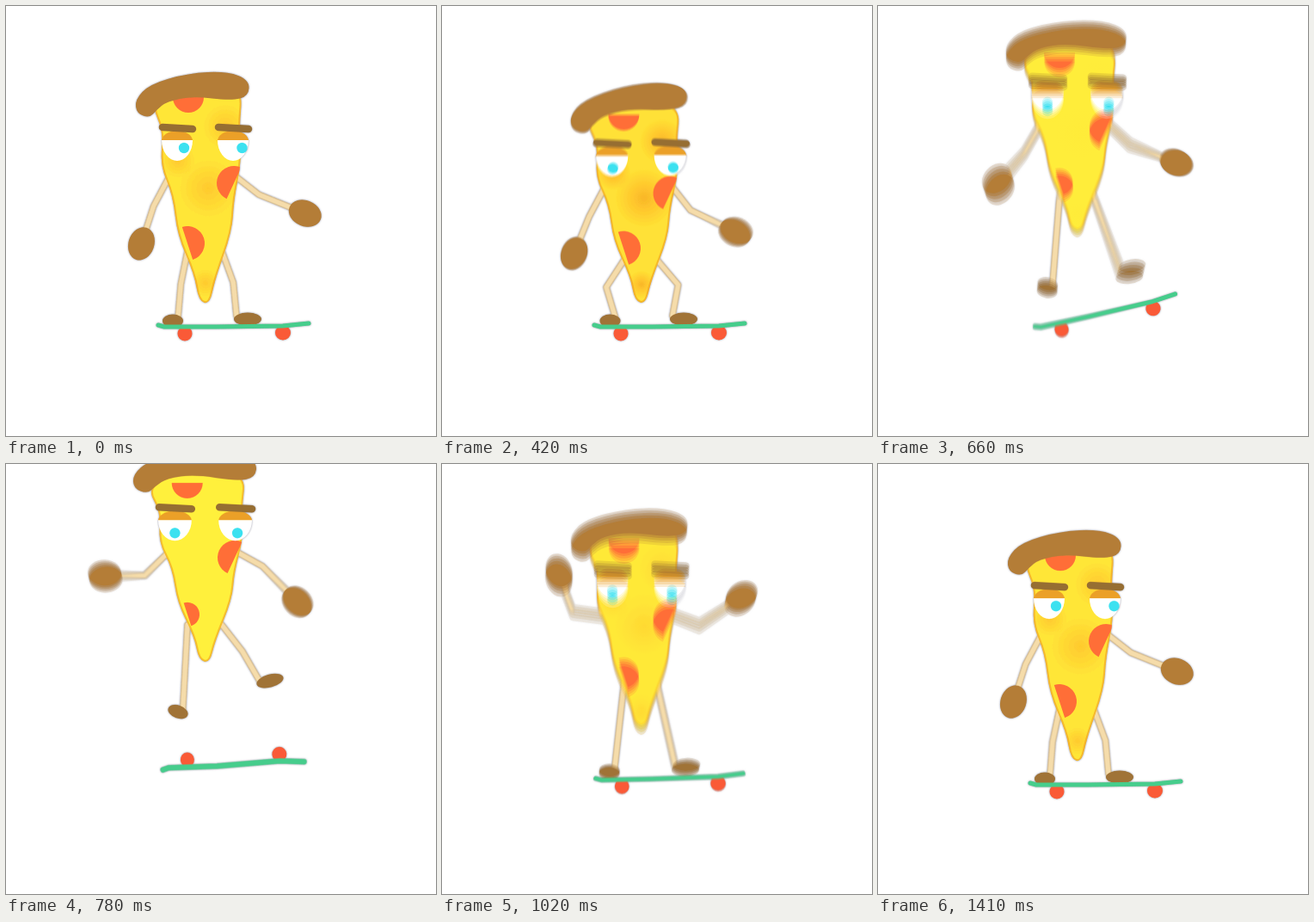
An HTML page with a canvas that plays this animation: 500 by 500 pixels, repeating every 1440 ms.

```html
<!DOCTYPE html>
<html>
<head>
<meta charset="utf-8">
<style>
  html, body { margin: 0; height: 100%; overflow: hidden; background: #fff; }
  canvas { display: block; }
</style>
</head>
<body>
<canvas id="stage" width="500" height="500"></canvas>
<script>
const SIZE = 500, LOOP = 1440, STEP = 30, SHUTTER = 22, SAMPLES = 5;
const TAU = Math.PI * 2, rad = d => d * Math.PI / 180;
const BROWN = '#b07b37', FOOT = '#a07335', BROW = '#966c30', PEPPERONI = '#ff6a35', WHEEL = '#f95a34';

const OUTLINE = [[168, 112], [183, 146], [179, 185], [194, 220], [199, 266], [219, 312], [224, 343],
  [237, 347], [243, 318], [263, 262], [265, 225], [274, 180], [271, 145], [276, 88], [200, 92]];
const CRUST = [[-67, 8], [-50, -10], [-5, -23], [40, -25], [66, -15], [65, 4], [45, 9], [0, 4],
  [-30, 10], [-42, 20], [-50, 29], [-65, 24]];
const BAKED = [[235, 212, 34], [200, 180, 20], [255, 140, 26], [232, 322, 16]];

const stage = document.getElementById('stage').getContext('2d');
const layer = () => Object.assign(document.createElement('canvas'), { width: SIZE, height: SIZE }).getContext('2d');
const c = layer(), blend = layer();

const clamp = x => Math.max(0, Math.min(1, x));
const ramp = (t, from, to) => { const u = clamp((t - from) / (to - from)); return u * u * (3 - 2 * u); };
const bump = (t, from, peak, to) => ramp(t, from, peak) - ramp(t, peak, to);
const polar = ([x, y], length, degrees) =>
  [x + length * Math.cos(rad(degrees)), y + length * Math.sin(rad(degrees))];

function smoothPath(points) {
  const mid = (p, q) => [(p[0] + q[0]) / 2, (p[1] + q[1]) / 2];
  c.beginPath();
  c.moveTo(...mid(points[points.length - 1], points[0]));
  points.forEach((p, i) => c.quadraticCurveTo(...p, ...mid(p, points[(i + 1) % points.length])));
  c.closePath();
}

function oval(x, y, rx, ry, color, degrees = 0, from = 0, to = 360) {
  c.fillStyle = color;
  c.beginPath();
  c.ellipse(x, y, rx, ry, rad(degrees), rad(from), rad(to));
  c.fill();
}

function line(points, width, color) {
  c.lineCap = c.lineJoin = 'round';
  c.lineWidth = width;
  c.strokeStyle = color;
  c.beginPath();
  points.forEach(p => c.lineTo(...p));
  c.stroke();
}

function limb(...points) {
  line(points, 7.5, '#d9c196');
  line(points, 5, '#f3d8a6');
}

function glow(x, y, r, alpha) {
  const g = c.createRadialGradient(x, y, 0, x, y, r);
  g.addColorStop(0, `rgba(245,140,25,${alpha})`);
  g.addColorStop(1, 'rgba(245,140,25,0)');
  c.fillStyle = g;
  c.fillRect(x - r, y - r, 2 * r, 2 * r);
}

// The knee follows from a fixed shin and thigh length; side picks where it bends.
function drawLeg(hip, foot, heel, length, degrees, side) {
  const [ax, ay] = polar([foot[0], foot[1] - 4], heel, degrees);
  const dx = ax - hip[0], dy = ay - hip[1], reach = Math.hypot(dx, dy);
  const bend = side * .75 * Math.sqrt(Math.max(0, 39 ** 2 - reach ** 2 / 4)) / reach;
  limb(hip, [hip[0] + dx / 2 + dy * bend, hip[1] + dy / 2 - dx * bend], [ax, ay]);
  oval(...foot, length, 7.5, FOOT, degrees);
}

function drawArm(shoulder, upper, upperAngle, fore, foreAngle) {
  const elbow = polar(shoulder, upper, upperAngle), hand = polar(elbow, fore, foreAngle);
  limb(shoulder, elbow, hand);
  oval(...hand, 19.5, 15, BROWN, foreAngle);
}

function drawBoard(t, air) {
  const flip = TAU * clamp((t - 690) / 180);
  const face = Math.cos(flip), edge = Math.abs(Math.sin(flip));
  c.save();
  c.translate(264, 372 - 23 * air);
  c.rotate(rad(-4 * air - 12 * bump(t, 540, 620, 760)));
  c.scale(1 - .06 * air, 1);
  oval(-56, 9 * face, 8.5, 8.5, WHEEL);
  oval(58, 8 * face, 9, 8.5, WHEEL);
  line([[-87, -face], [-80, face], [-20, 1], [58, 0], [88, -3 * face]], 5 + 7 * edge, '#43cb88');
  c.restore();
}

function drawBody(place, shade, air) {
  smoothPath(OUTLINE.map(p => place(...p)));
  c.save();
  c.clip();
  c.fillStyle = '#ffec38';
  c.fill();
  c.fillStyle = `rgba(250,160,30,${shade * .25})`;
  c.fill();
  for (const [x, y, r] of BAKED) glow(...place(x, y), r, shade * .7);
  line([], 0, '');
  smoothPath(OUTLINE.map(p => place(...p)));
  c.lineWidth = 4;
  c.strokeStyle = 'rgba(232,140,30,.5)';
  c.stroke();
  const slice = (x, y, r, from) => oval(...place(x, y), r, r, PEPPERONI, 0, from, from + 180);
  slice(212, 106, 18, 0);
  slice(265, 206, 20, 115);
  slice(211, 276 + 6 * air, 20 - 6 * air, -108);
  c.restore();
}

function drawEye(x, y, gazeX, gazeY, wide) {
  oval(x, y, 18 * wide, 12, '#eaa024', 0, 180, 360);
  oval(x, y - 1, 18 * wide, 24, '#fff', 0, 0, 180);
  oval(x + gazeX, y + gazeY, 6.2, 6.2, '#38deec');
  line([[x - 17 * wide, y - 16], [x + 18 * wide, y - 14]], 8.5, BROW);
}

function drawScene(t) {
  // Actions: turn aside, load the spring, fly, land.
  const turn = bump(t, 0, 270, 540);
  const load = bump(t, 300, 540, 660);
  const land = bump(t, 1010, 1120, 1400);
  const air = Math.max(0, 1 - ((t - 780) / (t < 780 ? 220 : 290)) ** 2);
  const tuck = air * air;
  const crouch = load + .7 * land;

  const squash = ramp(t, 270, 540) * (1 - clamp((t - 540) / 870) ** 1.6) + .25 * land;
  const scale = 1 - .15 * squash;
  const wide = 1 - .07 * turn + .14 * load + .08 * air;
  const tip = 342 - 115 * air + 4 * land;
  const place = (x, y) => {
    const spread = clamp((250 - y) / 130);
    return [228 + (x - 228) * (1 + (wide - 1) * spread), tip + (y - 342) * scale];
  };

  c.clearRect(0, 0, SIZE, SIZE);
  const hipY = tip - 57 + 130 * (1 - scale);
  drawLeg([211, hipY], [194 + 3 * crouch + 6 * tuck, 366 - 78 * tuck], 6, 12, 20 * tuck, -1);
  drawLeg([251, hipY], [281 + 26 * tuck, 364 - 112 * tuck], -13, 16, -15 * tuck, 1);
  drawBoard(t, air);

  const raiseL = bump(t, 540, 1020, 1230), raiseR = bump(t, 540, 1020, 1380);
  const swing = bump(t, 300, 590, 740);
  drawArm(place(189, 200), 37, 118 + 70 * raiseL ** 2, 46, 108 + 10 * turn + 142 * raiseL);
  drawArm(place(268, 199), 33, 38 + 20 * turn + 15 * swing + 20 * land - 18 * raiseR,
    58, 22 + 38 * turn - 33 * swing + 54 * tuck - 61 * raiseR);

  drawBody(place, clamp(.45 + .5 * turn + .15 * load - .6 * air), air);

  c.save();
  c.translate(217 - 4 * turn + 4 * load + 3 * air, tip - 241 + 170 * (1 - scale));
  c.rotate(rad(3 * air - 8 * crouch));
  c.scale(wide, 1);
  smoothPath(CRUST);
  c.fillStyle = BROWN;
  c.fill();
  c.restore();

  const look = ramp(t, 0, 540) - ramp(t, 1020, 1410);
  const gazeX = 8 * (1 - look), gazeY = 8 + 6 * Math.sqrt(look);
  const eyeY = tip - 185 * scale + 3 * load, lean = 1.5 * turn - 2 * crouch;
  drawEye(231.5 - 32.5 * wide, eyeY - lean, gazeX, gazeY, wide);
  drawEye(231.5 + 32.5 * wide, eyeY + lean, gazeX + 2.5, gazeY, wide);
}

function frame() {
  const t = Math.floor((performance.now() - start) % LOOP / STEP) * STEP;
  // Average several instants for motion blur.
  blend.globalCompositeOperation = 'lighter';
  blend.globalAlpha = 1 / SAMPLES;
  blend.clearRect(0, 0, SIZE, SIZE);
  for (let i = 0; i < SAMPLES; i++) {
    const offset = ((i + .5) / SAMPLES - .5) * SHUTTER;
    drawScene((t + offset + LOOP) % LOOP);
    blend.drawImage(c.canvas, 0, 0);
  }
  stage.shadowColor = 'transparent';
  stage.fillStyle = '#fff';
  stage.fillRect(0, 0, SIZE, SIZE);
  stage.shadowColor = 'rgba(80,80,105,.6)';
  stage.shadowBlur = 2.5;
  stage.drawImage(blend.canvas, 0, 0);
  requestAnimationFrame(frame);
}
const start = performance.now();
frame();
</script>
</body>
</html>
```
